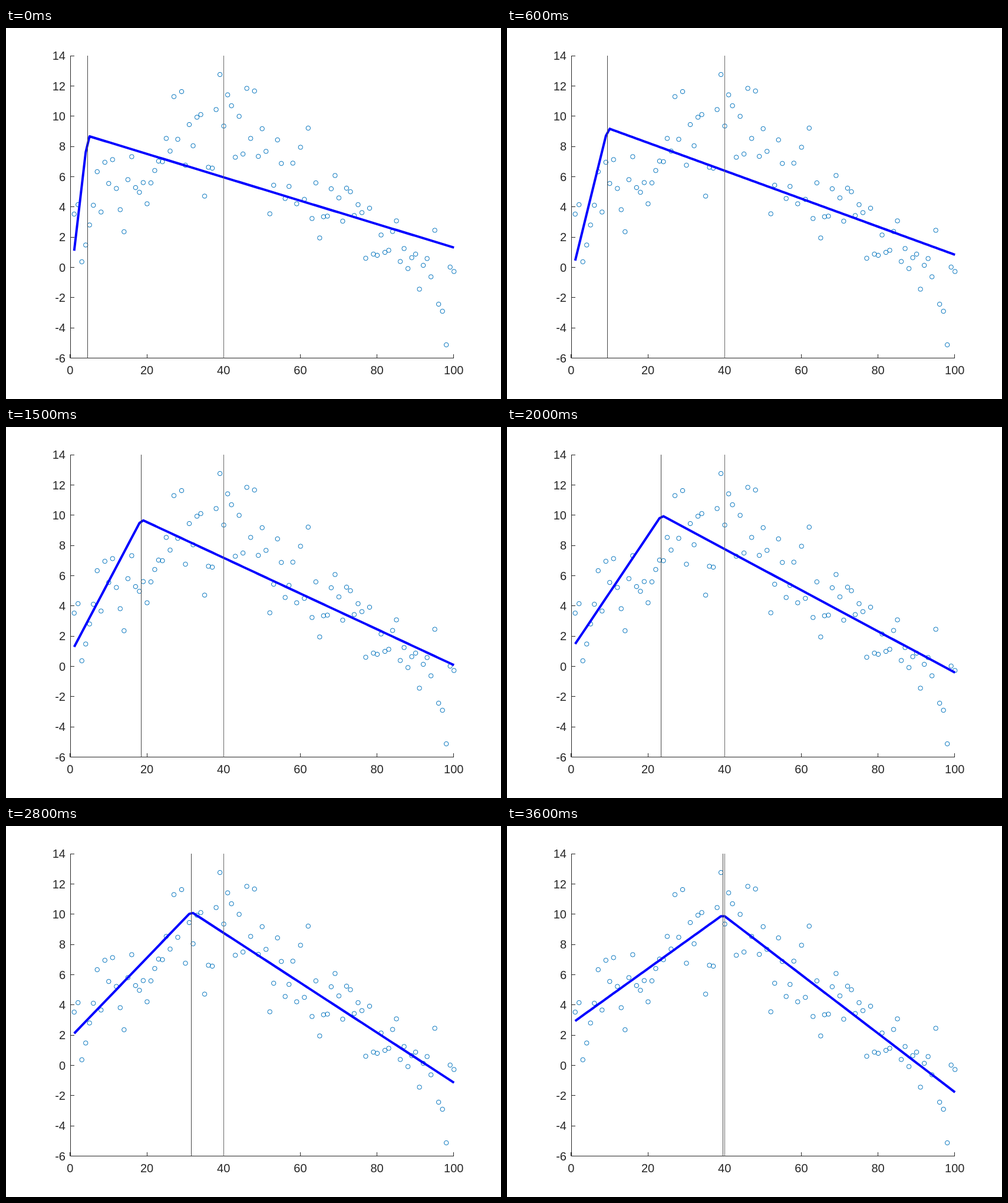
An HTML page for the animation above (3.8 s loop, 840 px wide and 630 px high).

```html
<!DOCTYPE html>
<html lang="en">
<head>
<meta charset="utf-8">
<title>Breakpoint fit</title>
<style>
  html, body { margin: 0; width: 100%; height: 100%; overflow: hidden; background: #fff; }
  svg { display: block; }
  text { font: 20px "Liberation Sans", Arial, sans-serif; fill: #262626; }
  .axis { stroke: #262626; fill: none; }
  .point { stroke: #0072bd; fill: none; }
  .true-break { stroke: #6a6a6a; }
  .break { stroke: #454545; }
  .fit { stroke: #00f; stroke-width: 4; stroke-linejoin: round; fill: none; }
</style>
</head>
<body>
<svg id="plot" width="840" height="630" viewBox="0 0 840 630"></svg>
<script>
const LOOP = 3800, STEP = 100, LAST_STEP = 35;
const FIRST_BREAK = 4.5, TRUE_BREAK = 40;
const TOP = 47.5, BOTTOM = 560.5;

// Sample heights in stage pixels for x = 1..100.
const samples = [
  316, 300, 397, 368.5, 334.5, 301, 244, 312.5, 228, 264,
  223.5, 272.5, 308.5, 346, 257.5, 218.5, 271, 279, 262.5, 298.5,
  263, 242, 226, 227, 187.5, 209, 116.5, 189, 108, 233,
  164, 200, 151.5, 147, 285.5, 236.5, 238, 138.5, 79, 166.5,
  113.5, 132, 219.5, 150, 214, 102.5, 187.5, 107, 218, 171,
  209.5, 315.5, 267, 190, 230, 289.5, 269, 229.5, 298.5, 202.5,
  291, 170, 323.5, 263, 356.5, 320.5, 319.5, 273, 250.5, 288.5,
  328, 272, 278, 318.5, 300, 313.5, 391, 306, 384, 386,
  351.5, 381, 377.5, 345.5, 327.5, 396.5, 374.5, 408.5, 390, 384,
  443.5, 403, 391.5, 422.5, 343.5, 469, 481, 538, 406, 413.5
];

const plot = document.getElementById("plot");
const toX = v => 109.2 + 6.51 * v;
const toY = v => 560.7 - 25.67 * (v + 6);
const snap = p => Math.floor(p - 0.25) + 0.5;

function add(tag, attrs, text = "") {
  const node = document.createElementNS("http://www.w3.org/2000/svg", tag);
  for (const key in attrs) node.setAttribute(key, attrs[key]);
  node.textContent = text;
  return plot.appendChild(node);
}

function label(text, x, y, anchor) {
  add("text", { x, y, "text-anchor": anchor }, text);
}

const vertical = v => `M${snap(toX(v))} ${TOP - 0.5}V${BOTTOM}`;

function drawAxes() {
  let d = `M109.5 47V${BOTTOM}H760`;
  for (let v = 0; v <= 100; v += 20) {
    d += `M${snap(toX(v))} ${BOTTOM}v-6.5`;
    label(v, toX(v) - 0.4, 588, "middle");
  }
  for (let v = -6; v <= 14; v += 2) {
    d += `M109.5 ${snap(toY(v) + 0.1)}h6.5`;
    label(v, 101, toY(v) + 7, "end");
  }
  add("path", { class: "axis", d });
}

function solve(m) {
  const n = m.length;
  for (let i = 0; i < n; i++) {
    const pivot = m[i][i];
    m[i] = m[i].map(v => v / pivot);
    for (let r = 0; r < n; r++) {
      if (r === i) continue;
      const k = m[r][i];
      m[r] = m[r].map((v, c) => v - k * m[i][c]);
    }
  }
  return m.map(row => row[n]);
}

// Continuous two-piece least-squares line with its knot at `knot`.
function fitPath(knot) {
  const basis = x => [1, x, Math.max(x - knot, 0)];
  const m = [0, 1, 2].map(() => [0, 0, 0, 0]);
  samples.forEach((y, i) => {
    const b = basis(i + 1), row = [...b, y];
    b.forEach((bi, r) => row.forEach((v, c) => { m[r][c] += bi * v; }));
  });
  const coef = solve(m);
  return "M" + samples.map((_, i) => {
    const y = basis(i + 1).reduce((sum, b, k) => sum + b * coef[k], 0);
    return `${toX(i + 1).toFixed(2)} ${y.toFixed(2)}`;
  }).join("L");
}

drawAxes();
samples.forEach((cy, i) => add("circle", { class: "point", cx: toX(i + 1), cy, r: 3.7 }));
const fitLine = add("path", { class: "fit" });
add("path", { class: "true-break", d: vertical(TRUE_BREAK) });
const breakLine = add("path", { class: "break" });

let shown = -1;
function render(time) {
  const step = Math.min(LAST_STEP, Math.max(0, Math.floor((time % LOOP) / STEP) - 1));
  if (step === shown) return;
  shown = step;
  const knot = FIRST_BREAK + step;
  fitLine.setAttribute("d", fitPath(knot));
  breakLine.setAttribute("d", vertical(knot));
}

const start = performance.now();
function tick() {
  render(performance.now() - start);
  requestAnimationFrame(tick);
}
tick();
</script>
</body>
</html>
```
